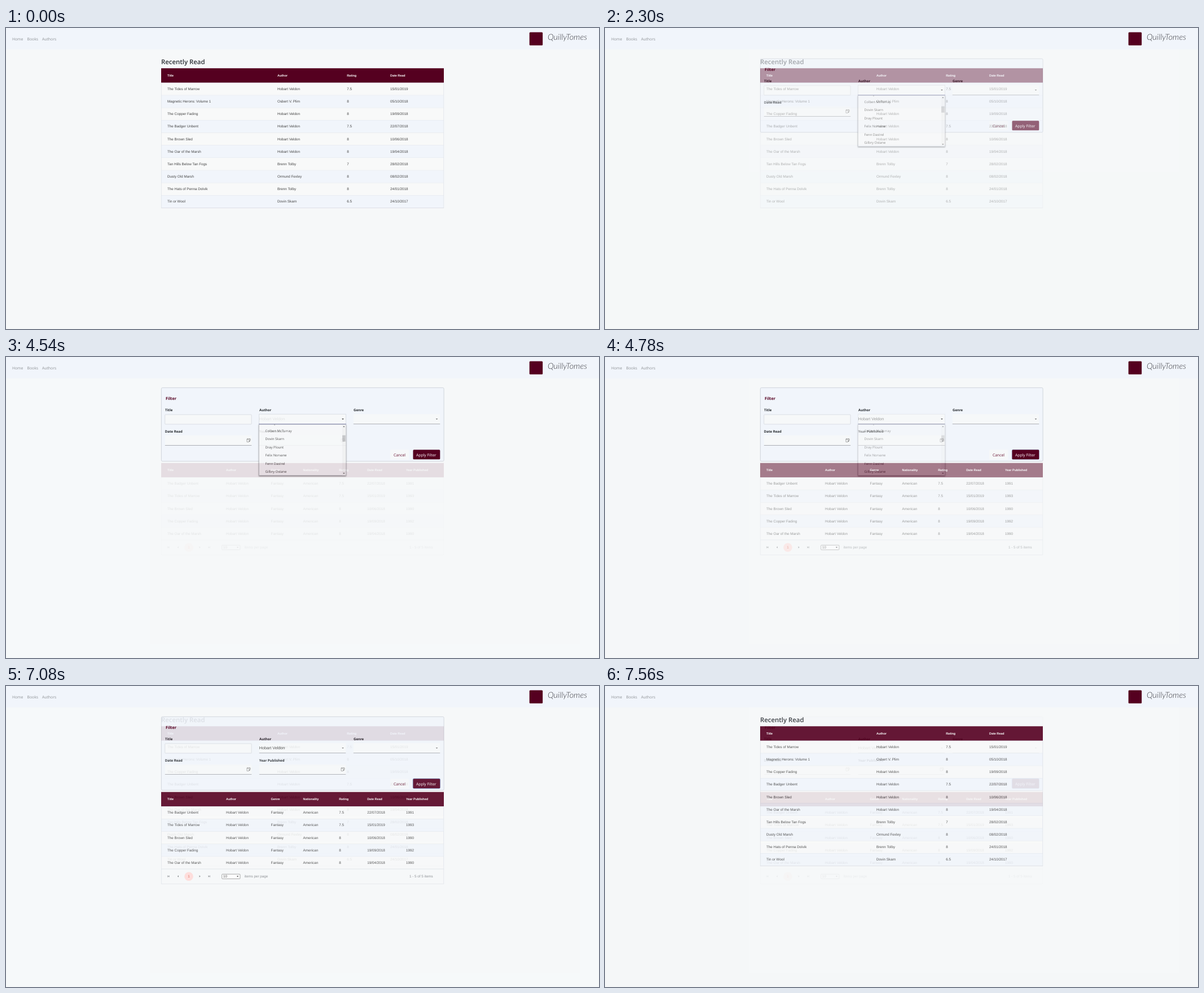
Write an HTML page that moves like this. It is 1051 by 533 pixels and loops after 7.62 s.

```html
<!DOCTYPE html>
<html lang="en">
<head>
<meta charset="utf-8">
<title>Reading list</title>
<style>
  html, body { margin: 0; width: 100%; height: 100%; overflow: hidden; background: #f6f8f9; }
  svg { display: block; width: 100%; height: 100%; }
  text { font: 6.3px "Liberation Sans", Arial, sans-serif; fill: #444; text-rendering: geometricPrecision; }
  .head { font-size: 5.45px; font-weight: 700; fill: #fff; }
  .ui { font-family: "Open Sans", sans-serif; font-size: 6.8px; }
  .nav { fill: #8d9195; }
  .heading { font-size: 11.4px; font-weight: 600; fill: #2a2e33; }
  .legend { font-size: 7.2px; font-weight: 700; fill: #550020; }
  .label { font-size: 6.05px; font-weight: 700; fill: #24282c; }
  .option { font-size: 5.95px; }
  .value { font-size: 7.2px; }
  .muted { fill: #85898d; }
  .page { fill: #d9604f; }
  .cancel { fill: #6b1735; }
  .apply { fill: #fff; }
  .brand { font: italic 300 14.5px Lato, sans-serif; fill: #3c3c42; }
</style>
</head>
<body>
<svg id="stage" viewBox="0 0 1051 533"></svg>
<script>
const PAPER = '#f6f8f9', TINT = '#f1f5fb', WINE = '#550020', RULE = '#dde1e7';
const HOLD = 2000, STEP = 60, SCENE = 2540;

const text = (x, y, s, cls = '') => `<text x="${x}" y="${y}" class="${cls}">${s}</text>`;
const rect = (x, y, w, h, fill, extra = '') =>
  `<rect x="${x}" y="${y}" width="${w}" height="${h}" fill="${fill}" ${extra}/>`;
const line = (x, y, w, color, width = 0.8) => rect(x, y - width / 2, w, width, color);
const path = (d, fill, extra = '') => `<path d="${d}" fill="${fill}" ${extra}/>`;
const down = (x, y, color = '#777', r = 1.8) =>
  path(`M${x - r} ${y - r / 2}h${2 * r}l${-r} ${r * 1.1}z`, color);
const side = (x, y, dir) => path(`M${x - dir} ${y - 1.7}v3.4l${2.2 * dir} -1.7z`, '#808488');

function table(top, columns, xs, rows) {
  const pitch = 22.17, first = top + 25.7;
  let out = rect(275, top, 501, 25.7, WINE);
  columns.forEach((name, i) => out += text(xs[i], top + 14.3, name, 'head'));
  rows.forEach((row, r) => {
    const y = first + r * pitch;
    out += rect(275, y, 501, pitch, r % 2 ? TINT : '#f8f9f9') + line(275, y + pitch, 501, RULE);
    row.split('|').forEach((cell, i) => out += text(xs[i], y + 12.9, cell));
  });
  const h = rows.length * pitch;
  return out + rect(275.3, first, 500.5, h, 'none', `stroke="${RULE}" stroke-width=".7"`);
}

function calendar(x, y) {
  return path(`M${x - 3} ${y - 2.7}h6v3.2l-2.4 2.4h-3.6zM${x - 3} ${y - 1.4}h6M${x - 1.5} ${y - 3.5}v1M${x + 1.5} ${y - 3.5}v1`,
    'none', 'stroke="#888" stroke-width=".7"') + rect(x + .4, y + .2, 1.8, 1.8, '#777');
}

const field = (x, y) => rect(x, y - 17.5, 153.5, 17.5, PAPER) + line(x, y, 153.5, '#9a9da3');
const dateField = (x, label) =>
  text(x, 133.6, label, 'ui label') + field(x, 156.4) + calendar(x + 148.2, 147.6);

function filterPanel(focused) {
  return rect(275.4, 54.4, 500.7, 130.2, TINT, 'rx="2" stroke="#c8cdd5" stroke-width=".8"') +
    text(283, 76.4, 'Filter', 'ui legend') +
    text(282, 95.8, 'Title', 'ui label') + text(449, 95.8, 'Author', 'ui label') +
    text(616, 95.8, 'Genre', 'ui label') +
    rect(281.7, 102, 153.4, 17, PAPER, 'rx="1" stroke="#d3d8df" stroke-width=".8"') +
    field(448.8, 118.7) + field(615.8, 118.7) + down(763.5, 110) +
    dateField(281.8, 'Date Read') + dateField(448.8, 'Year Published') +
    rect(681, 164, 33, 17.5, PAPER, 'rx="1.5"') + text(687, 175.5, 'Cancel', 'ui cancel') +
    (focused ? rect(720.7, 163.4, 49.2, 18.6, '#8fb2de', 'rx="2.4"') : '') +
    rect(721.5, 164.2, 47.8, 17.1, WINE, 'rx="1.5"') + text(727, 175.5, 'Apply Filter', 'ui apply');
}

function dropdown() {
  const names = ['Colben McTurray', 'Dovin Skarn', 'Dray Plount', 'Felix Norvane', 'Fenn Dastrel', 'Gilbry Ostane'];
  return rect(448.4, 101.2, 154.2, 18, PAPER, 'stroke="#d3d8df" stroke-width=".8"') +
    line(448, 119, 155, '#55589c', 1) + down(597, 110, '#333') +
    rect(448.4, 119.6, 154.2, 90.2, '#f7f8f9',
      'stroke="#b4b7bd" stroke-width=".6" style="filter:drop-shadow(0 1px 1.2px #0008)"') +
    names.map((name, i) => text(459.6, 132.7 + i * 14.46, name, 'ui option')).join('') +
    rect(595.8, 120, 6.4, 89.4, '#f0f1f2') + rect(596.1, 138.6, 5.6, 11.2, '#c1c2c5') +
    path('M597.4 124h3l-1.5-1.7z', '#444') + down(598.9, 206, '#444', 1.5) +
    rect(475, 119.7, 2, .8, '#777');
}

function pager() {
  return rect(275.3, 324, 500.5, 26.3, PAPER, `stroke="${RULE}" stroke-width=".7"`) +
    side(288.4, 337, -1) + rect(286, 335.4, .7, 3.2, '#808488') + side(305, 337, -1) +
    '<circle cx="324" cy="337.2" r="7.8" fill="#ffdcd9"/>' + text(322.3, 339.4, '1', 'page') +
    side(343.5, 337, 1) + side(359.6, 337, 1) + rect(361.3, 335.4, .7, 3.2, '#808488') +
    rect(382.7, 333.2, 32.2, 8.2, '#fff', 'rx="1" stroke="#777" stroke-width=".7"') +
    text(385, 339.4, '10') + down(410.5, 337.2, '#333', 1.7) +
    text(422.7, 339.3, 'items per page', 'muted') + text(715, 339.3, '1 - 5 of 5 items', 'muted');
}

const recent = text(275, 64.3, 'Recently Read', 'ui heading') +
  table(71.3, ['Title', 'Author', 'Rating', 'Date Read'], [286, 481, 604.2, 681], [
    'The Tides of Marrow|Hobart Veldon|7.5|15/01/2019',
    'Magnetic Herons: Volume 1|Osbert V. Plim|8|05/10/2018',
    'The Copper Fading|Hobart Veldon|8|19/09/2018',
    'The Badger Unbent|Hobart Veldon|7.5|22/07/2018',
    'The Brown Sled|Hobart Veldon|8|10/06/2018',
    'The Oar of the Marsh|Hobart Veldon|8|19/04/2018',
    'Tan Hills Below Tan Fogs|Brenn Tolby|7|28/02/2018',
    'Dusty Old Marsh|Ormund Fexley|8|08/02/2018',
    'The Hats of Penna Dolvik|Brenn Tolby|8|24/01/2018',
    'Tin or Wool|Dovin Skarn|6.5|24/10/2017']);

const choosing = filterPanel(false) + dropdown();

const by = 'Hobart Veldon|Fantasy|American';
const results = filterPanel(true) + text(448.8, 111.9, 'Hobart Veldon', 'value') + down(597, 110) +
  table(187.7, ['Title', 'Author', 'Genre', 'Nationality', 'Rating', 'Date Read', 'Year Published'],
    [286, 390, 469.6, 526.6, 590.2, 640.2, 709], [
      `The Badger Unbent|${by}|7.5|22/07/2018|1991`,
      `The Tides of Marrow|${by}|7.5|15/01/2019|1993`,
      `The Brown Sled|${by}|8|10/06/2018|1990`,
      `The Copper Fading|${by}|8|19/09/2018|1992`,
      `The Oar of the Marsh|${by}|8|19/04/2018|1990`]) + pager();

const stage = document.getElementById('stage');
stage.innerHTML = rect(0, 0, 1051, 38, TINT) +
  text(11, 21.7, 'Home', 'ui nav') + text(37.6, 21.7, 'Books', 'ui nav') + text(64, 21.7, 'Authors', 'ui nav') +
  rect(927.7, 7.5, 23.5, 23.2, WINE, 'rx="1.5"') + text(960, 21, 'QuillyTomes', 'brand') +
  [recent, choosing, results].map(s => `<g class="scene">${rect(0, 38, 1051, 495, PAPER)}${s}</g>`).join('');
const scenes = [...stage.querySelectorAll('.scene')];

// Each scene holds, then the next one fades over it in tenths.
let shown = '';
function draw(now) {
  const t = now % (SCENE * 3), i = Math.floor(t / SCENE), local = t - i * SCENE;
  const tenths = local < HOLD ? 0 : Math.floor((local - HOLD) / STEP) + 1;
  if (shown !== `${i}/${tenths}`) {
    shown = `${i}/${tenths}`;
    const next = (i + 1) % 3;
    scenes.forEach((scene, n) => scene.setAttribute('opacity', n === i ? 1 : n === next ? tenths / 10 : 0));
    stage.append(scenes[i], scenes[next]);
  }
  requestAnimationFrame(draw);
}
draw(performance.now());
</script>
</body>
</html>
```
